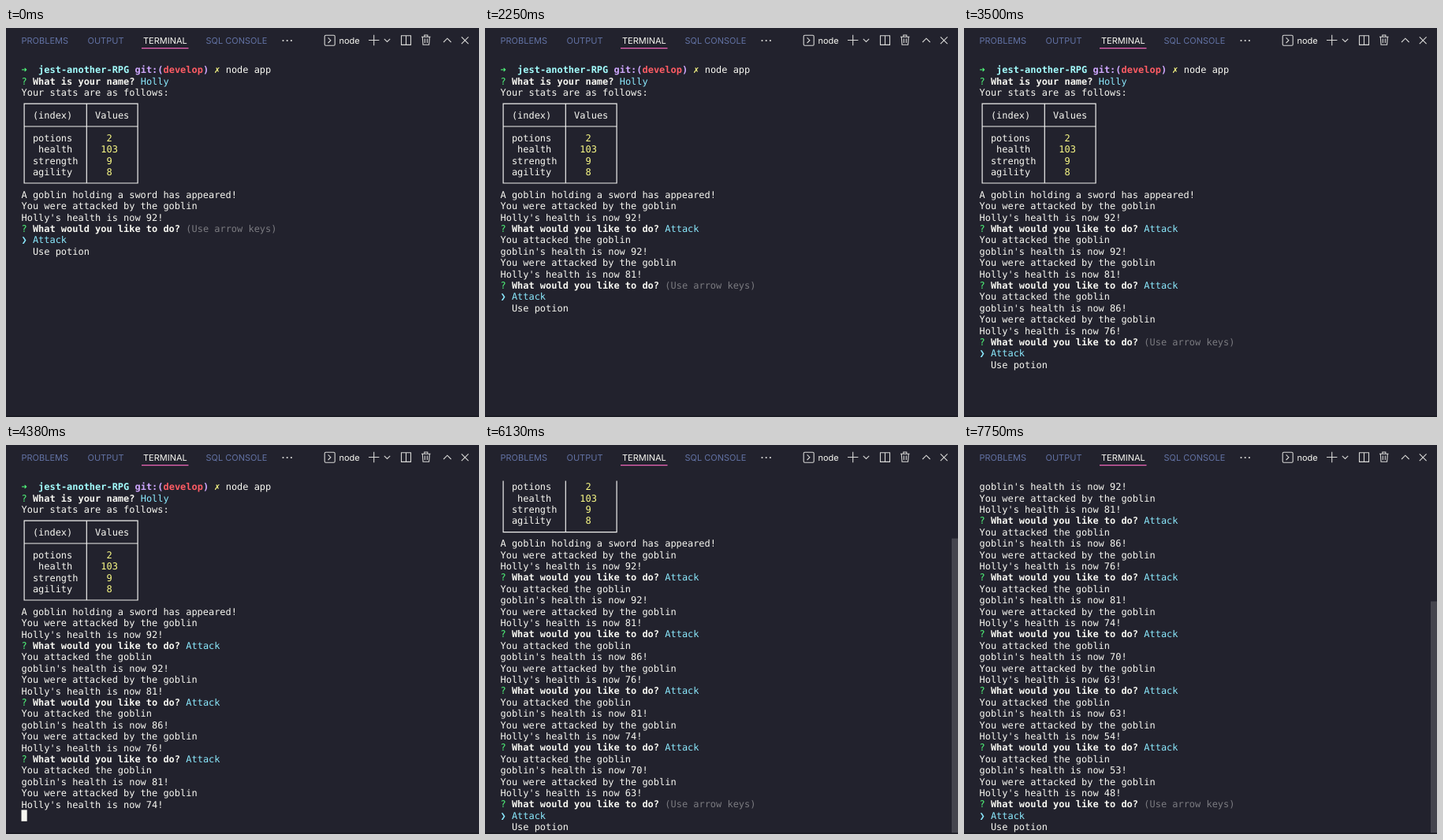
An HTML page that plays this animation: 600 by 494 pixels, repeating every 8000 ms.

```html
<!DOCTYPE html>
<html lang="en">
<head>
<meta charset="utf-8">
<title>Terminal RPG</title>
<style>
  html, body { margin: 0; width: 100%; height: 100%; overflow: hidden; background: #22222d; }
  svg { display: block; width: 600px; height: 494px; }
  text { text-rendering: geometricPrecision; }
  .ui { font: 11px Inter, sans-serif; fill: #6272a4; }
  .ui .on { fill: #f8f8f2; }
  .icon { fill: none; stroke: #d8d8d6; stroke-width: 1.1; }
  #log { font: 11.96px "DejaVu Sans Mono", monospace; fill: #f8f8f2; }
  #log .b { font-weight: bold; }
  .cyan { fill: #8be9fd; }
  .green { fill: #50fa7b; }
  .yellow { fill: #fbfb86; }
  .dim { fill: #7b7b80; }
  .path { fill: #a4ffff; }
  .git { fill: #d0a8ff; }
  .red { fill: #ff5c64; }
  .rule { fill: none; stroke: #f0f0ee; stroke-width: 1.2; }
</style>
</head>
<body>
<svg viewBox="0 0 600 494">
  <defs><clipPath id="view"><rect y="45.5" width="600" height="449"/></clipPath></defs>
  <rect width="600" height="494" fill="#22222d"/>
  <g class="ui">
    <text x="19.5" y="20">PROBLEMS</text>
    <text x="103.5" y="20">OUTPUT</text>
    <text x="174" y="20" class="on">TERMINAL</text>
    <text x="253.5" y="20">SQL CONSOLE</text>
    <text x="422.5" y="19.5" class="on">node</text>
  </g>
  <rect x="172" y="25" width="59.5" height="1.3" fill="#e664b4"/>
  <g fill="#d8d8d6">
    <circle cx="351.5" cy="16" r="1.1"/><circle cx="356.7" cy="16" r="1.1"/><circle cx="361.9" cy="16" r="1.1"/>
  </g>
  <g class="icon">
    <rect x="404.2" y="9.2" width="13" height="13" rx="1.5"/>
    <path d="M408.6 12.4l3.3 3.3-3.3 3.3"/>
    <path d="M460 15.5h13.4M466.7 8.8v13.4"/>
    <path d="M479.8 13.8l3.7 3.7 3.7-3.7"/>
    <path d="M501.5 9.8h12v11.6h-12zM507.5 9.8v11.6"/>
    <path d="M527 11.2h11.5M530.8 11v-2h4v2M528.3 11.4l.7 9.9h7.6l.7-9.9M531.3 13.5v5.6M534.3 13.5v5.6"/>
    <path d="M555 18l4.8-4.8 4.8 4.8"/>
    <path d="M577.8 11.4l8.8 8.8M586.6 11.4l-8.8 8.8"/>
  </g>
  <g clip-path="url(#view)"><g id="log"></g></g>
  <rect id="thumb" x="592" width="8" fill="#45454e"/>
  <rect y="492.4" width="600" height="1.6" fill="#191a22"/>
</svg>
<script>
const LOOP = 8000, CELL = 7.2, ROW = 14.4, LEFT = 19.5, TOP = 45.8, VISIBLE = 31;
const HERO = 'Holly';

// goblin's health, hero's health after each round
const rounds = [[92, 81], [86, 76], [81, 74], [70, 63], [63, 54], [53, 48]];

// start time, rounds played, menu open
const steps = [
  [0, 0, true], [1000, 1, true], [3130, 2, true], [4380, 3, false],
  [4500, 3, true], [6000, 4, true], [7000, 5, true], [7500, 6, true]
];

const log = document.getElementById('log');
const thumb = document.getElementById('thumb');

// a row is a list of [column, text, classes]
const line = text => [[0, text]];
const ask = (question, answer, color) => [
  [0, '?', 'green'], [2, question, 'b'], [3 + question.length, answer, color]
];
const turn = (answer, color) => ask('What would you like to do?', answer, color);
const hit = health => [line('You were attacked by the goblin'), line(`${HERO}'s health is now ${health}!`)];
const stat = (col, name, valueCol, value) => [[col, name], [valueCol, value, 'yellow']];

const intro = [
  [[0, '➜', 'b green'], [3, 'jest-another-RPG', 'b path'], [20, 'git:(', 'b git'],
   [25, 'develop', 'b red'], [32, ')', 'b git'], [34, '✗', 'b yellow'], [36, 'node app']],
  ask('What is your name?', HERO, 'cyan'),
  line('Your stats are as follows:'),
  [],
  [[2, '(index)'], [13, 'Values']],
  [],
  stat(2, 'potions', 15, '2'),
  stat(3, 'health', 14, '103'),
  stat(2, 'strength', 15, '9'),
  stat(2, 'agility', 15, '8'),
  [],
  line('A goblin holding a sword has appeared!'),
  ...hit(92)
];

const colX = c => LEFT + c * CELL;
const rowY = r => TOP + r * ROW;

function tableRules() {
  const [x0, x1, x2] = [0, 11, 20].map(c => colX(c + 0.5));
  const [y0, y1, y2] = [3, 5, 10].map(r => rowY(r + 0.5));
  return `<path class="rule" d="M${x0} ${y0}H${x2}V${y2}H${x0}ZM${x0} ${y1}H${x2}M${x1} ${y0}V${y2}"/>`;
}

function rowsFor(count, menu) {
  const rows = [...intro];
  for (const [goblin, hero] of rounds.slice(0, count)) {
    rows.push(turn('Attack', 'cyan'), line('You attacked the goblin'),
      line(`goblin's health is now ${goblin}!`), ...hit(hero));
  }
  if (menu) {
    rows.push(turn('(Use arrow keys)', 'dim'),
      [[0, '❯', 'cyan'], [2, 'Attack', 'cyan']], [[2, 'Use potion']]);
  } else {
    rows.push([]);
  }
  return rows;
}

function draw([, count, menu]) {
  const rows = rowsFor(count, menu);
  const scroll = Math.max(0, rows.length - VISIBLE);
  let out = tableRules();
  rows.forEach((row, r) => {
    for (const [col, text, cls = ''] of row) {
      out += `<text x="${colX(col)}" y="${rowY(r) + 11.5}" class="${cls}">${text}</text>`;
    }
  });
  if (!menu) out += `<rect x="${LEFT}" y="${rowY(rows.length - 1)}" width="${CELL}" height="${ROW}"/>`;
  log.innerHTML = out;
  log.setAttribute('transform', `translate(0 ${-scroll * ROW})`);

  const top = 46 + 448 * scroll / rows.length;
  thumb.setAttribute('y', top);
  thumb.setAttribute('height', scroll ? 494 - top : 0);
}

let shown;
const start = performance.now();
function tick() {
  const t = (performance.now() - start) % LOOP;
  const step = steps.findLast(s => s[0] <= t);
  if (step !== shown) draw(shown = step);
  requestAnimationFrame(tick);
}
tick();
</script>
</body>
</html>
```
